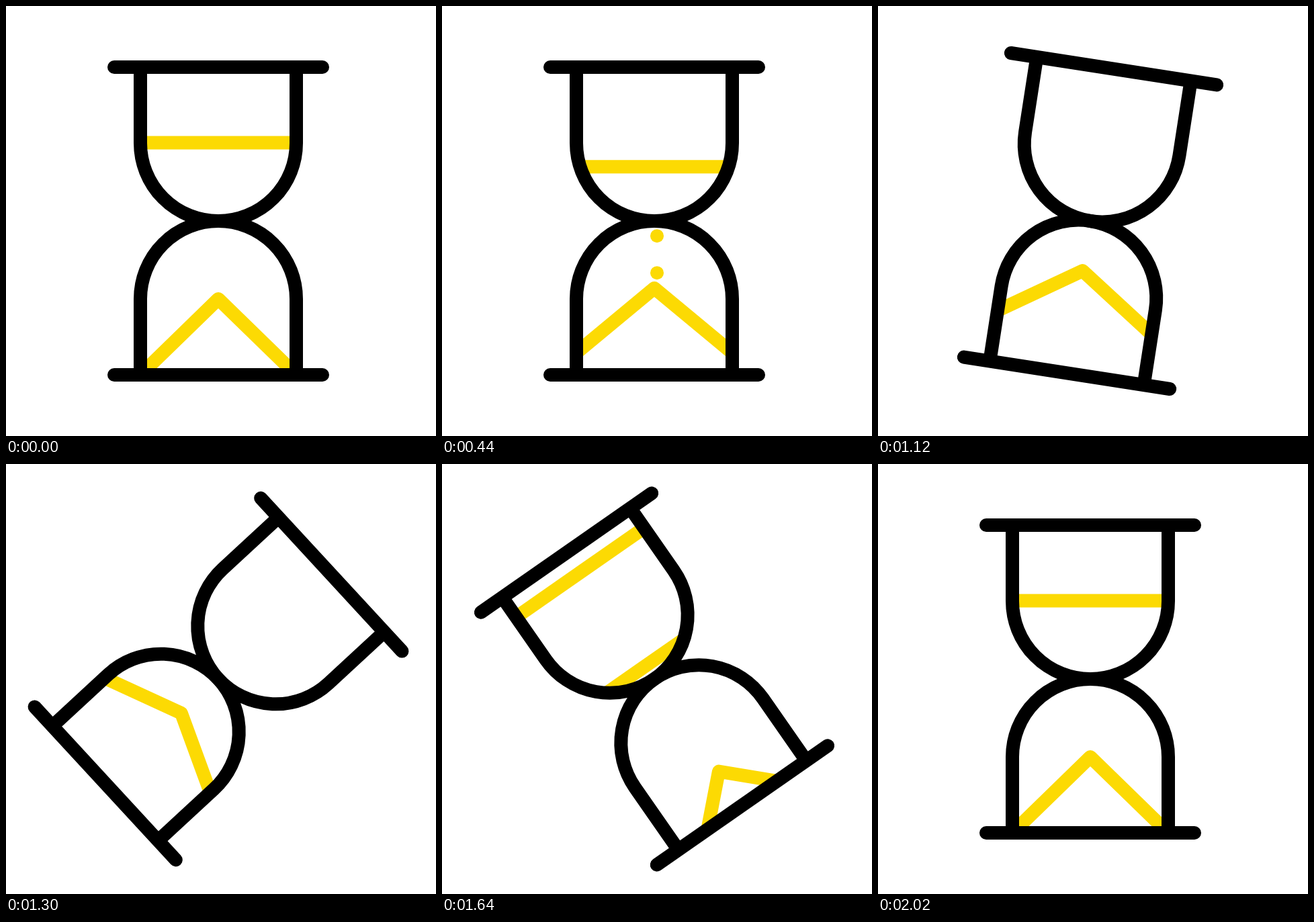
An HTML page with a canvas that plays this animation: 640x640 px, repeating every 2200 ms.

```html
<!DOCTYPE html>
<html lang="en">
<head>
<meta charset="utf-8">
<title>Hourglass</title>
<style>
  html, body { margin: 0; width: 100%; height: 100%; overflow: hidden; background: #fff; }
  canvas { display: block; width: 100vw; height: 100vh; }
</style>
</head>
<body>
<canvas id="stage" width="640" height="640"></canvas>
<script>
const ctx = document.getElementById('stage').getContext('2d');
const LOOP = 2200, SAND = '#fcda03', R = 116, BAR = 229;

// All coordinates are relative to the neck of the glass.
const clamp = x => Math.min(1, Math.max(0, x));
const ease = (t, from, to) => {
  const s = clamp((t - from) / (to - from));
  return s * s * (3 - 2 * s);
};
const mix = (a, b, k) => a + (b - a) * k;

// Smooth curve through [time, value] keys, at rest on both ends.
function track(t, keys) {
  const last = keys.length - 1;
  if (t <= keys[0][0]) return keys[0][1];
  if (t >= keys[last][0]) return keys[last][1];
  const slope = i => {
    if (i === 0 || i === last) return 0;
    const rate = j => (keys[j + 1][1] - keys[j][1]) / (keys[j + 1][0] - keys[j][0]);
    const a = rate(i - 1), b = rate(i);
    return a * b <= 0 ? 0 : 2 * a * b / (a + b);
  };
  const i = keys.findIndex(k => k[0] > t) - 1;
  const [t0, a] = keys[i], [t1, b] = keys[i + 1];
  const d = t1 - t0, s = (t - t0) / d, u = 1 - s;
  return a * u * u * (1 + 2 * s) + b * s * s * (3 - 2 * s)
    + d * s * u * (u * slope(i) - s * slope(i + 1));
}

const APEX = [[0, 116], [440, 100], [740, 85.5], [1050, 75], [1300, 75], [1640, 23.6], [1800, 0]];
const ENDS = [[0, 229], [440, 196.3], [740, 171.7], [1050, 156], [1120, 153],
  [1300, 123.5], [1640, 23.6], [1800, 0]];

function bulbPath(side) {
  ctx.beginPath();
  ctx.moveTo(-R, side * BAR);
  ctx.lineTo(-R, side * R);
  ctx.arc(0, side * R, R, Math.PI, 0, side < 0);
  ctx.lineTo(R, side * BAR);
}

function inBulb(side, paint) {
  ctx.save();
  bulbPath(side);
  ctx.closePath();
  ctx.clip();
  paint();
  ctx.restore();
}

function band(apex, ends) {
  ctx.strokeStyle = SAND;
  ctx.lineCap = 'butt';
  ctx.beginPath();
  ctx.moveTo(-R, ends);
  ctx.lineTo(0, apex);
  ctx.lineTo(R, ends);
  ctx.stroke();
}

function grain(t, start, speed, floor) {
  const y = (t - start) * speed;
  if (y < 0 || y > floor + 3) return;
  ctx.fillStyle = SAND;
  ctx.beginPath();
  ctx.arc(4, y, 10, 0, 2 * Math.PI);
  ctx.fill();
}

function glass() {
  ctx.strokeStyle = '#000';
  for (const side of [-1, 1]) {
    ctx.lineCap = 'butt';
    bulbPath(side);
    ctx.stroke();
    ctx.lineCap = 'round';
    ctx.beginPath();
    ctx.moveTo(-155, side * BAR);
    ctx.lineTo(155, side * BAR);
    ctx.stroke();
  }
}

function draw(t) {
  ctx.setTransform(1, 0, 0, 1, 0, 0);
  ctx.fillStyle = '#fff';
  ctx.fillRect(0, 0, 640, 640);
  ctx.translate(316, 320);
  ctx.rotate(Math.PI * ease(t, 1002, 1892));
  ctx.lineWidth = 20;
  ctx.lineJoin = 'round';

  const apex = track(t, APEX);
  if (t < 1023) {
    const level = mix(-116.5, 0, Math.pow(t / 1023, 1.408));
    inBulb(-1, () => band(level, level));
  }
  if (t < 1800) {
    inBulb(1, () => {
      band(apex, track(t, ENDS));
      grain(t, 0, 0.175, apex);
      grain(t, 300, 0.157, apex);
    });
  }

  // Fresh sand, upright once the glass has turned over.
  if (t > 1340) {
    ctx.save();
    ctx.rotate(Math.PI);
    const level = mix(-BAR, -116.5, ease(t, 1424, 2000));
    const peak = mix(240, 116, ease(t, 1340, 1882));
    inBulb(-1, () => band(level, level));
    inBulb(1, () => band(peak, peak + 113));
    ctx.restore();
  }
  glass();
}

const begin = performance.now();
function tick(now) {
  draw(Math.max(0, now - begin) % LOOP);
  requestAnimationFrame(tick);
}
draw(0);
requestAnimationFrame(tick);
</script>
</body>
</html>
```
